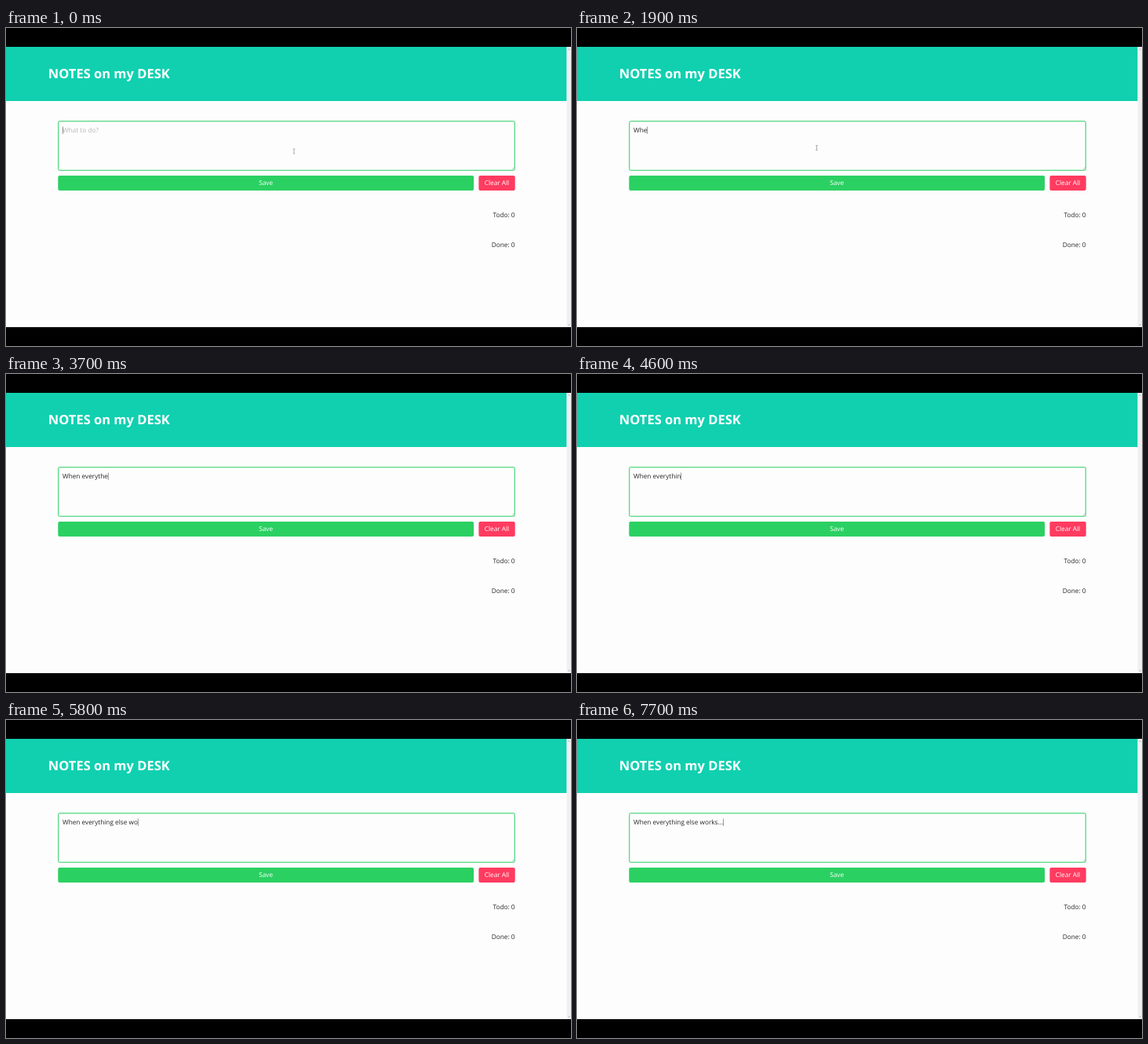
Write an HTML page that moves like this. It is 720 px wide and 405 px high and loops after 8000 ms.

```html
<!DOCTYPE html>
<html lang="en">
<head>
<meta charset="utf-8">
<title>Todo list</title>
<style>
  html, body { margin: 0; width: 100%; height: 100%; overflow: hidden; background: #000; }
  svg { display: block; width: 720px; height: 405px; }
  text {
    font: 8.25px "Open Sans", "Noto Sans", sans-serif;
    fill: #262626;
    text-rendering: geometricPrecision;
    white-space: pre;
  }
  .title { font-size: 16.5px; font-weight: 700; fill: #fff; }
  .label { fill: #fff; text-anchor: middle; }
  .count { text-anchor: end; }
  #hint { fill: #b8b8b8; }
</style>
</head>
<body>
<svg viewBox="0 0 720 405">
  <rect width="720" height="405" fill="#000"/>
  <rect y="24" width="720" height="357" fill="#fefdfe"/>
  <rect y="24" width="714.6" height="69" fill="#10d0b0"/>
  <rect x="714.6" y="24" width="5.4" height="357" fill="#f1f0f1"/>
  <path d="M716.3 27.6h2.4l-1.2 -1.4zM716.3 377.4h2.4l-1.2 1.4z" fill="#999"/>
  <text class="title" x="53.8" y="64.4">NOTES on my DESK</text>

  <rect x="66" y="118" width="583" height="64" rx="2.4" fill="#bdf0cf"/>
  <rect x="66.8" y="118.8" width="581.4" height="62.4" rx="1.8" fill="#fefdfe" stroke="#35d06a" stroke-width="1"/>
  <path d="M644.6 180.2l3 -3M646.2 180.2l1.4 -1.4" stroke="#999" stroke-width=".5"/>
  <text id="hint" x="72" y="133.2">What to do?</text>
  <text id="typed" x="72" y="133.2"></text>
  <rect id="caret" y="125.6" width=".6" height="9.4" fill="#555"/>

  <rect x="66.3" y="188" width="529.8" height="19" rx="2" fill="#2bd062"/>
  <text class="label" x="331.2" y="200.2">Save</text>
  <rect x="602.4" y="188" width="46.3" height="19" rx="2" fill="#ff3b60"/>
  <text class="label" x="625.5" y="200.2">Clear All</text>
  <text class="count" x="648.5" y="241.3">Todo: 0</text>
  <text class="count" x="648.5" y="279.3">Done: 0</text>

  <path id="beam" d="M-1.3 -3h1l.3 .3l.3 -.3h1M0 -2.7v5.4M-1.3 3h1l.3 -.3l.3 .3h1" fill="none" stroke="#777" stroke-width=".6"/>
</svg>
<script>
const LOOP = 8000, BLINK = 600;
const el = id => document.getElementById(id);
const hint = el('hint'), typed = el('typed'), caret = el('caret'), beam = el('beam');

// [time, typed keys]; "<" is backspace
const keys = [
  [1500, 'W'], [1700, 'h'], [1900, 'e'], [2200, 'n'], [2400, ' '],
  [2500, 'e'], [2700, 'v'], [2800, 'e'], [3000, 'r'], [3100, 'y'],
  [3300, 't'], [3500, 'h'], [3700, 'e'], [4300, '<'], [4400, 'i'],
  [4600, 'n'], [4700, 'g'], [4900, ' '], [5000, 'e'], [5100, 'l'],
  [5300, 's'], [5500, 'e'], [5600, ' '], [5800, 'wo'], [6000, 'r'],
  [6100, 'k'], [6300, 's'], [7400, '.'], [7500, '.'], [7700, '.']
];
// [time, x, y] of the pointer, hidden while typing goes on
const moves = [[0, 367, 157], [100, 358, 156.4], [300, 322, 153.8], [400, 305.5, 152.5]];
const HIDE = 2200;

const show = (node, on) => node.setAttribute('visibility', on ? 'visible' : 'hidden');

function draw(t) {
  let text = '', last = -200;
  for (const [time, key] of keys) {
    if (time > t) break;
    text = key === '<' ? text.slice(0, -1) : text + key;
    last = time;
  }
  if (typed.textContent !== text) typed.textContent = text;
  show(hint, !text);
  caret.setAttribute('x', 72 + (text ? typed.getComputedTextLength() : 0));
  show(caret, Math.floor((t - last) / BLINK) % 2 === 0);

  const [, x, y] = moves.filter(m => m[0] <= t).pop();
  beam.setAttribute('transform', `translate(${x} ${y})`);
  show(beam, t < HIDE);
}

const start = performance.now();
function tick() {
  draw((performance.now() - start) % LOOP);
  requestAnimationFrame(tick);
}
tick();
</script>
</body>
</html>
```
